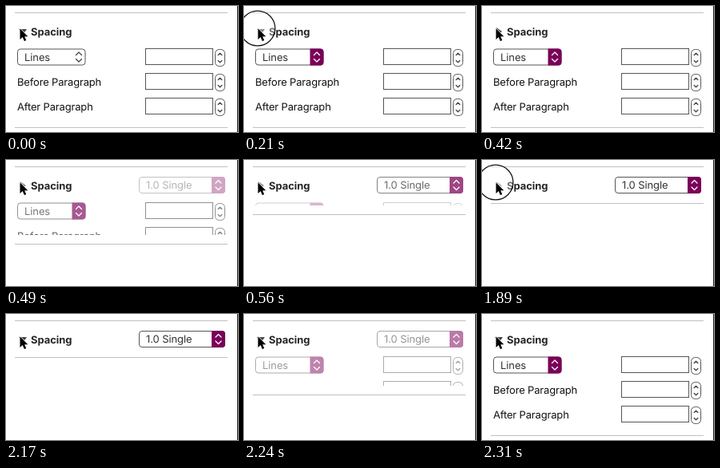
Animation of 290 by 158 pixels, one loop 2940 ms. Source, as an HTML page:

```html
<!DOCTYPE html>
<html lang="en">
<head>
<meta charset="utf-8">
<title>Collapsible spacing panel</title>
<style>
html, body { margin: 0; width: 100%; height: 100%; overflow: hidden; background: #fff; }
svg { display: block; width: 290px; height: 158px; }
text { font: 13px Inter, "Open Sans", sans-serif; letter-spacing: -.17px; fill: #111; text-rendering: geometricPrecision; }
.title { font-weight: 700; letter-spacing: -.05px; fill: #262626; }
.value { fill: #333; letter-spacing: -.1px; }
.rule { stroke: #c0c0c0; }
.box { fill: #fff; stroke: #555; }
.accent { fill: #7b0058; }
.chevron { fill: none; stroke: #444; stroke-width: 1.3; stroke-linecap: round; stroke-linejoin: round; }
.active .chevron { stroke: #fff; }
.inactive .accent { display: none; }
</style>
</head>
<body>
<svg viewBox="0 0 290 158">
  <clipPath id="clip"><rect id="window" y="46" width="290" height="96"/></clipPath>
  <path class="rule" d="M11 8.5H277"/>
  <text class="title" x="31" y="36.5">Spacing</text>
  <g id="single"></g>
  <g clip-path="url(#clip)"><g id="details"></g></g>
  <path id="divider" class="rule" d="M11 .5H277"/>
  <path id="triangle" d="M-5 -3H5L0 4Z"/>
  <circle id="ring" cx="17" cy="28" r="21.9" fill="#fff" fill-opacity=".35" stroke="#111" stroke-width="1.3"/>
  <path d="M17.5 28.3V42L20.7 39L22.9 44L25.3 43L23.2 38.2H27.3Z" fill="#000" stroke="#fff" stroke-width="1.3" paint-order="stroke"/>
  <path d="M289.5 0V158" stroke="#222"/>
</svg>
<script>
const LOOP = 2940, STEP = 70, OPEN_Y = 152, CLOSED_Y = 54;
const $ = id => document.getElementById(id);
const clamp = v => Math.max(0, Math.min(1, v));
const ramp = (t, start, length) => clamp((t - start) / length);

const chevrons = (x, y, w, gap) =>
  `<path class="chevron" d="M${x - w} ${y - gap}l${w} ${-w}l${w} ${w}M${x - w} ${y + gap}l${w} ${w}l${w} ${-w}"/>`;

function select(x, y, w, h, label) {
  const r = x + w;
  return `<rect class="box" x="${x + .5}" y="${y + .5}" width="${w - 1}" height="${h - 1}" rx="3.5"/>
    <path class="accent" d="M${r - 17} ${y}h13q4 0 4 4v${h - 8}q0 4 -4 4h-13z"/>
    ${chevrons(r - 8.5, y + h / 2, 3.5, 2.5)}
    <text class="value" x="${x + 9}" y="${y + h / 2 + 4.5}">${label}</text>`;
}

const field = y =>
  `<rect class="box" x="174.5" y="${y - .5}" width="84" height="20"/>
   <rect class="box" x="261.5" y="${y + .5}" width="12" height="21" rx="5"/>
   ${chevrons(267.5, y + 11, 2.3, 3.5)}`;

$("single").innerHTML = select(166, 21, 108, 21, "1.0 Single");
$("single").setAttribute("class", "active");
$("details").innerHTML =
  `<g id="lines">${select(14, 53.5, 85.5, 21, "Lines")}</g>
   <text x="14" y="100">Before Paragraph</text>
   <text x="14" y="131">After Paragraph</text>` + [54, 85, 116].map(field).join("");

function draw(now) {
  const t = Math.floor(now % LOOP / STEP) * STEP;
  const within = (a, b) => t >= a && t < b;
  const closing = ramp(t, 425, 186), opening = ramp(t, 2175, 135);
  const fade = closing - opening;
  const fold = 1 - (1 - closing) ** 1.5 - opening;
  const y = Math.round(OPEN_Y + (CLOSED_Y - OPEN_Y) * fold);

  $("single").setAttribute("opacity", fade);
  $("details").setAttribute("opacity", 1 - fade);
  $("window").setAttribute("height", Math.max(0, y - 11 - 46));
  $("divider").setAttribute("transform", `translate(0 ${y})`);
  $("lines").setAttribute("class", t < 210 ? "inactive" : "active");

  const collapsed = within(420, 2170);
  const pressed = within(350, 490) || within(1960, 2170);
  $("triangle").setAttribute("transform", `translate(21 32) rotate(${collapsed ? -90 : 0})`);
  $("triangle").setAttribute("fill", pressed || !collapsed ? "#444" : "#888");
  $("ring").style.display = within(210, 350) || within(1890, 2030) ? "" : "none";
}

const start = performance.now();
function tick() {
  draw(performance.now() - start);
  requestAnimationFrame(tick);
}
tick();
</script>
</body>
</html>
```
